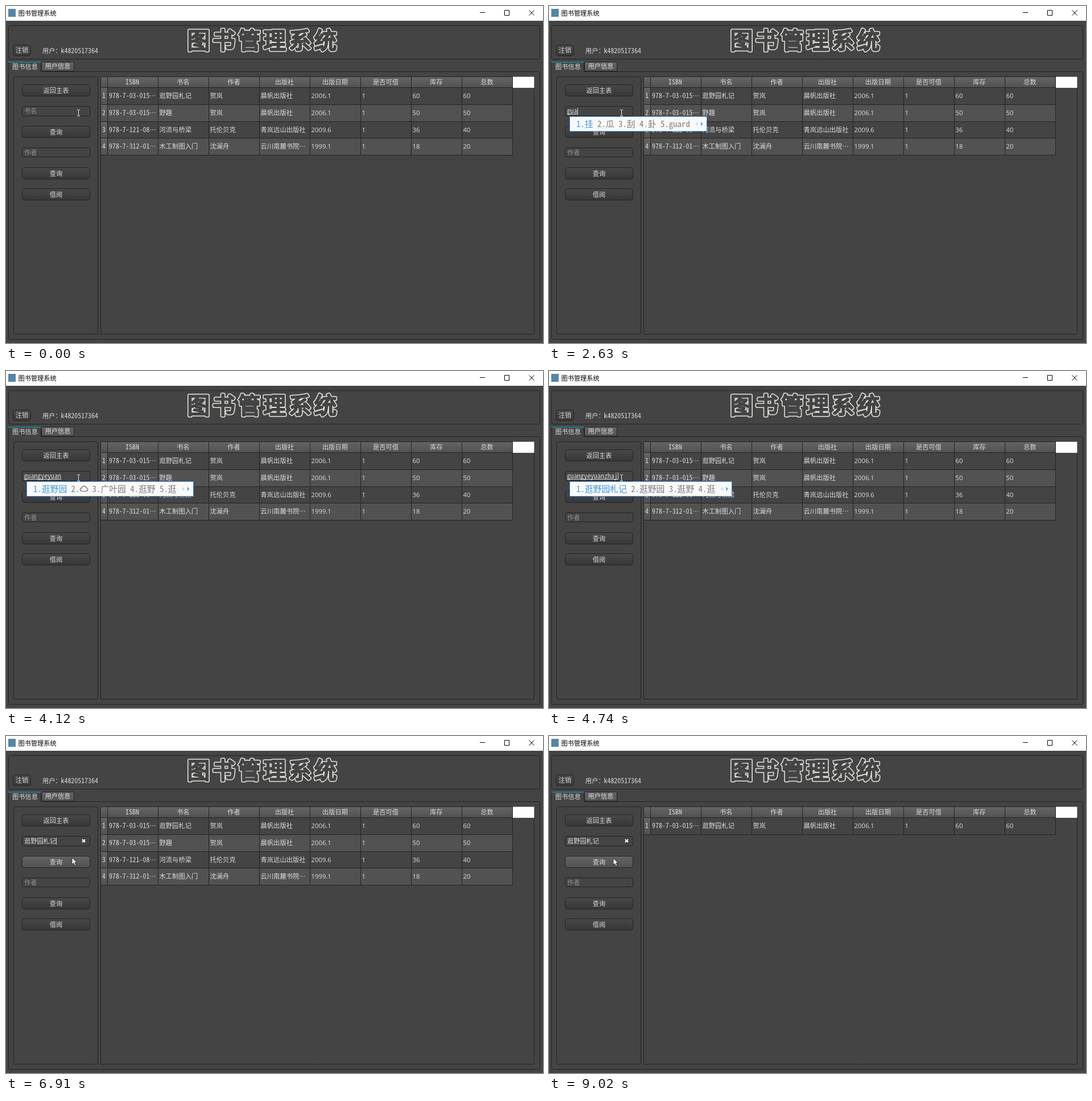
Recreate the animation shown at these times as an HTML page with a canvas. Size 944 px wide and 593 px high, loop 9800 ms.

```html
<!DOCTYPE html>
<html lang="zh-CN">
<head>
<meta charset="utf-8">
<title>图书管理系统</title>
<style>
html, body { margin: 0; width: 100%; height: 100%; overflow: hidden; background: #444; }
canvas { display: block; }
</style>
</head>
<body>
<canvas id="stage" width="944" height="593"></canvas>
<script>
const ctx = document.getElementById('stage').getContext('2d');
const LOOP = 9800;
const BG = '#444444', LINE = '#242424', INK = '#dcdcdc', HINT = '#929292', BLUE = '#3c97e6';
const LIGHT = ['#646464', '#525252'], DARK = ['#484848', '#383838'];
const MONO = '"Noto Sans Mono CJK SC", "Noto Sans CJK SC", "Noto Sans CJK", monospace';
const UI = '"Noto Sans CJK SC", "Noto Sans CJK", sans-serif';
const CELL = '"Open Sans", "Noto Sans", "Noto Sans CJK SC", "Noto Sans CJK", sans-serif';
const SMALL = '11.2px ' + UI, CODE = '11.9px ' + MONO, BODY = '11.3px ' + CELL;

const HEADS = ['ISBN', '书名', '作者', '出版社', '出版日期', '是否可借', '库存', '总数'];
const BOOKS = [
  ['978-7-03-015⋯', '逛野园札记', '贺岚', '晨帆出版社', '2006.1', '1', '60', '60'],
  ['978-7-03-015⋯', '野趣', '贺岚', '晨帆出版社', '2006.1', '1', '50', '50'],
  ['978-7-121-08⋯', '河流与桥梁', '托伦贝克', '青岚远山出版社', '2009.6', '1', '36', '40'],
  ['978-7-312-01⋯', '木工制图入门', '沈澜舟', '云川南麓书院⋯', '1999.1', '1', '18', '20']
];
const QUERY = BOOKS[0][1];

// [start, composed letters, candidates]
const WIDE = '1.逛野雨 2.广野鱼 3.光叶雨 4.逛夜雨 5.逛';
const LAST = '1.逛野园札记 2.逛野园 3.逛野 4.逛';
const COMPOSE = [
  [2490, 'g', '1.个 2.跟 3.给 4.过 5.更'],
  [2560, 'gu', '1.古 2.故 3.顾 4.股 5.骨'],
  [2630, 'gua', '1.挂 2.瓜 3.刮 4.卦 5.guard'],
  [2720, 'guan', '1.关 2.管 3.观 4.馆 5.惯'],
  [2880, 'guang', '1.广 2.光 3.逛 4.咣 5.桄'],
  [3110, 'guangy', '1.逛野 2.广野 3.逛 4.光 5.广'],
  [3270, 'guangye', '1.逛野 2.广野 3.光叶 4.逛 5.光'],
  [3420, 'guangyey', '1.逛野园 2.逛野 3.广野 4.逛 5.光'],
  [3970, 'guangyeyu', WIDE],
  [4050, 'guangyeyua', WIDE],
  [4120, 'guangyeyuan', '1.逛野园 2.☁ 3.广叶园 4.逛野 5.逛'],
  [4370, 'guangyeyuanz', LAST],
  [4430, 'guangyeyuanzh', LAST],
  [4740, 'guangyeyuanzhaj', LAST]
];
const COMMIT = 5290;
// [start, x, y] of the pointer
const POINTER = [
  [0, 128, 188], [6620, 127, 190], [6700, 124, 196], [6770, 120, 206], [6850, 116, 214],
  [6930, 113, 219], [7000, 112, 221], [7080, 111, 222], [8700, 111, 220],
  [8880, 112, 218], [8950, 112, 216], [9020, 113, 215]
];

const within = (t, a, b) => t >= a && t < b;
const clamp = v => Math.max(0, Math.min(1, v));
const latest = (list, t) => list.filter(k => k[0] <= t).pop();

function text(str, x, y, font = SMALL, color = INK, align = 'left') {
  ctx.font = font;
  ctx.fillStyle = color;
  ctx.textAlign = align;
  ctx.fillText(str, x, y);
}

function shade(y, h, [top, bottom]) {
  const g = ctx.createLinearGradient(0, y, 0, y + h);
  g.addColorStop(0, top);
  g.addColorStop(1, bottom);
  return g;
}

function box(x, y, w, h, r = 0, fill = null, stroke = LINE) {
  ctx.beginPath();
  ctx.roundRect(x + .5, y + .5, w, h, r);
  if (fill) { ctx.fillStyle = fill; ctx.fill(); }
  ctx.strokeStyle = stroke;
  ctx.lineWidth = 1;
  ctx.stroke();
}

function line(points, color, width = 1) {
  ctx.beginPath();
  points.forEach(([x, y]) => ctx.lineTo(x, y));
  ctx.strokeStyle = color;
  ctx.lineWidth = width;
  ctx.stroke();
}

function rect(x, y, w, h, color) {
  ctx.fillStyle = color;
  ctx.fillRect(x, y, w, h);
}

function button(label, x, y, w, h, colors = DARK) {
  box(x, y, w, h, 4, shade(y, h, colors));
  text(label, x + w / 2 + .5, y + h / 2 + 4.5, SMALL, INK, 'center');
}

function drawTitleBar() {
  rect(0, 0, 944, 26, '#ffffff');
  rect(4, 5, 13, 14, '#5286a8');
  text('图书管理系统', 21.5, 16.5, SMALL, '#000');
  rect(833, 11, 9, 1, '#000');
  box(876, 7, 8, 9, 0, null, '#000');
  line([[919.5, 7.5], [928.5, 16.5]], '#000');
  line([[928.5, 7.5], [919.5, 16.5]], '#000');
}

function drawBanner() {
  box(4, 34, 934, 59, 3);
  ctx.lineJoin = ctx.lineCap = 'round';
  ctx.font = '39.5px ' + UI;
  ctx.textAlign = 'center';
  const outline = (width, color) => {
    ctx.lineWidth = width;
    ctx.strokeStyle = ctx.fillStyle = color;
    [...'图书管理系统'].forEach((c, i) => {
      const x = 338.5 + i * 44.6;
      ctx.strokeText(c, x, 75);
      ctx.fillText(c, x, 75);
    });
  };
  outline(6, '#e6e6e0');
  outline(2.9, BG);
  ctx.lineJoin = 'miter';
  ctx.lineCap = 'butt';
  button('注销', 12, 68, 31, 19);
  text('用户：', 64, 83);
  text('k4820517364', 96.5, 83, CODE);
}

function drawTabs() {
  box(4, 115, 934, 471, 2);
  box(62, 98, 57, 16, 0, shade(98, 17, LIGHT));
  rect(4, 98, 58, 18, BG);
  line([[4.5, 115], [4.5, 98]], LINE);
  line([[61.5, 98], [61.5, 115.5]], LINE);
  rect(4, 98, 58, 1.5, '#188fa0');
  text('图书信息', 33.5, 111, SMALL, INK, 'center');
  text('用户信息', 91, 110, SMALL, INK, 'center');
}

function drawTable(rows) {
  const left = 178, step = 89, top = 143;
  const rowY = i => Math.round(top + .4 + i * 29.6);
  rect(891, 124.5, 38, 19.3, '#ffffff');
  box(166, 124, 762, 453);
  rect(891, 124.5, 37.5, 19.3, '#ffffff');
  rect(167, 125, 724, 18, shade(125, 18, LIGHT));
  HEADS.forEach((h, i) => {
    text(h, left + step * (i + .5) - (i ? 0 : .5), 138, i ? SMALL : CODE, INK, 'center');
  });
  rows.forEach((row, r) => {
    const y = rowY(r), h = rowY(r + 1) - y;
    if (r % 2) rect(179, y, 712, h, '#525252');
    rect(167, y, 11, h, shade(y, h, LIGHT));
    text(r + 1, 172, y + 19.2, CODE, INK, 'center');
    row.forEach((v, c) => {
      const x = left + step * c + 3;
      if (c) text(v, x - .5, y + 19, BODY);
      else {
        text(v.slice(0, -1), x, y + 19.2, CODE);
        text(v.slice(-1), x + 71.5, y + 19.2, SMALL);
      }
    });
  });
  rows.forEach((_, r) => rect(167, rowY(r + 1), 724, 1, LINE));
  rect(167, top, 724, 1, LINE);
  const bottom = rowY(rows.length);
  for (let i = 0; i <= HEADS.length; i++) rect(left + step * i, 124, 1, bottom - 123, LINE);
}

function drawSide(t) {
  box(13, 124, 148, 453, 3);
  const pressed = within(t, 7230, 7310);
  button('返回主表', 28, 138, 119, 20);
  button('查询', 28, 211, 119, 20, t >= 6850 && !pressed ? LIGHT : DARK);
  button('查询', 28, 284, 119, 20);
  button('借阅', 28, 321, 119, 20);
  box(28, 176, 119, 17, 2);
  box(28, 249, 119, 16, 2);
  text('作者', 32, 261.5, SMALL, HINT);
}

function caret(x) {
  rect(x, 179, 1, 12, INK);
}

function drawField(t) {
  const typing = within(t, COMPOSE[0][0], COMMIT);
  const spaced = within(t, 1390, 2020);
  if (typing) {
    const letters = latest(COMPOSE, t)[1];
    text(letters, 31.5, 188.5, CODE);
    const w = ctx.measureText(letters).width;
    rect(32, 190, w, 1, INK);
    if (!within(t, 4120, 4370) && t < 4970) caret(Math.round(32 + w));
  } else if (t >= COMMIT) {
    text(QUERY, 32, 189);
    if (within(t, 5520, 6070) || within(t, 6620, 7230)) caret(88);
  } else {
    if (!spaced) text('书名', 32, 189, SMALL, HINT);
    if (within(t, 460, 1010) || t >= 2170) caret(32);
    if (within(t, 1390, 1940)) caret(38);
  }
  // the clear mark fades with the presence of text
  const shown = t < 2490
    ? Math.min(clamp((t - 1330) / 230), clamp((2170 - t) / 150))
    : clamp((t - 5370) / 150);
  ctx.globalAlpha = shown;
  line([[134, 182], [139, 187]], '#fff', 2);
  line([[139, 182], [134, 187]], '#fff', 2);
  ctx.globalAlpha = 1;
}

function cloud(x, y) {
  ctx.beginPath();
  ctx.moveTo(x + 4, y + 4.5);
  ctx.arc(x + 4, y + 1.5, 3, Math.PI / 2, Math.PI * 1.5);
  ctx.arc(x + 7.5, y - 1, 3.7, Math.PI, Math.PI * 1.9);
  ctx.arc(x + 11.3, y + 1.5, 3, -Math.PI / 2, Math.PI / 2);
  ctx.closePath();
  ctx.strokeStyle = '#666';
  ctx.lineWidth = 1.2;
  ctx.stroke();
}

function arrow(x, dir, color) {
  ctx.beginPath();
  ctx.moveTo(x, 203.5);
  ctx.lineTo(x + 4 * dir, 207.5);
  ctx.lineTo(x, 211.5);
  ctx.fillStyle = color;
  ctx.fill();
}

function drawCandidates(t) {
  if (!within(t, COMPOSE[0][0], 5370)) return;
  const words = latest(COMPOSE, t)[2].split(' ');
  const font = '14.8px ' + MONO, em = 14.8;
  const spread = s => [...s].reduce((n, c) => n + (c > '~' ? em : em / 2), 0);
  const end = 48 + spread(words.join(' '));
  ctx.save();
  if (t < 2560) {
    ctx.globalAlpha = .5;
    ctx.translate(0, 3);
  } else if (t >= COMMIT) ctx.globalAlpha = .4;
  box(36, 194, Math.round(end + 30) - 37, 26, 0, '#f9f9f9', '#3589d5');
  let x = 48;
  words.forEach((word, i) => {
    const color = i ? '#7c7c7c' : BLUE;
    if (word.endsWith('☁')) {
      text(word.slice(0, -1), x, 212.5, font, color);
      cloud(x + em, 207);
    } else text(word, x, 212.5, font, color);
    x += spread(word + ' ');
  });
  arrow(end + 13.5, -1, '#d0dfec');
  arrow(end + 19, 1, '#62abea');
  ctx.restore();
}

function drawPointer(t) {
  const [, x, y] = latest(POINTER, t);
  if (y < 194) {
    rect(x - 1, y - 5, 1, 10, '#eee');
    for (const e of [-6, 5]) {
      rect(x - 3, y + e, 2, 1, '#eee');
      rect(x, y + e, 2, 1, '#eee');
    }
    return;
  }
  const shape = [[0, 0], [0, 12], [2.7, 9.5], [4.7, 14], [6.8, 13], [4.8, 8.7], [8.4, 8.7]];
  ctx.beginPath();
  shape.forEach(([dx, dy]) => ctx.lineTo(x + dx, y + dy));
  ctx.closePath();
  ctx.fillStyle = '#fff';
  ctx.fill();
  ctx.strokeStyle = '#111';
  ctx.lineWidth = .8;
  ctx.stroke();
}

function draw(t) {
  rect(0, 0, 944, 593, BG);
  drawTitleBar();
  drawBanner();
  drawTabs();
  drawTable(t < 7390 ? BOOKS : BOOKS.slice(0, 1));
  drawSide(t);
  drawField(t);
  drawPointer(t);
  drawCandidates(t);
}

const start = performance.now();
function tick() {
  draw((performance.now() - start) % LOOP);
  requestAnimationFrame(tick);
}
tick();
</script>
</body>
</html>
```
